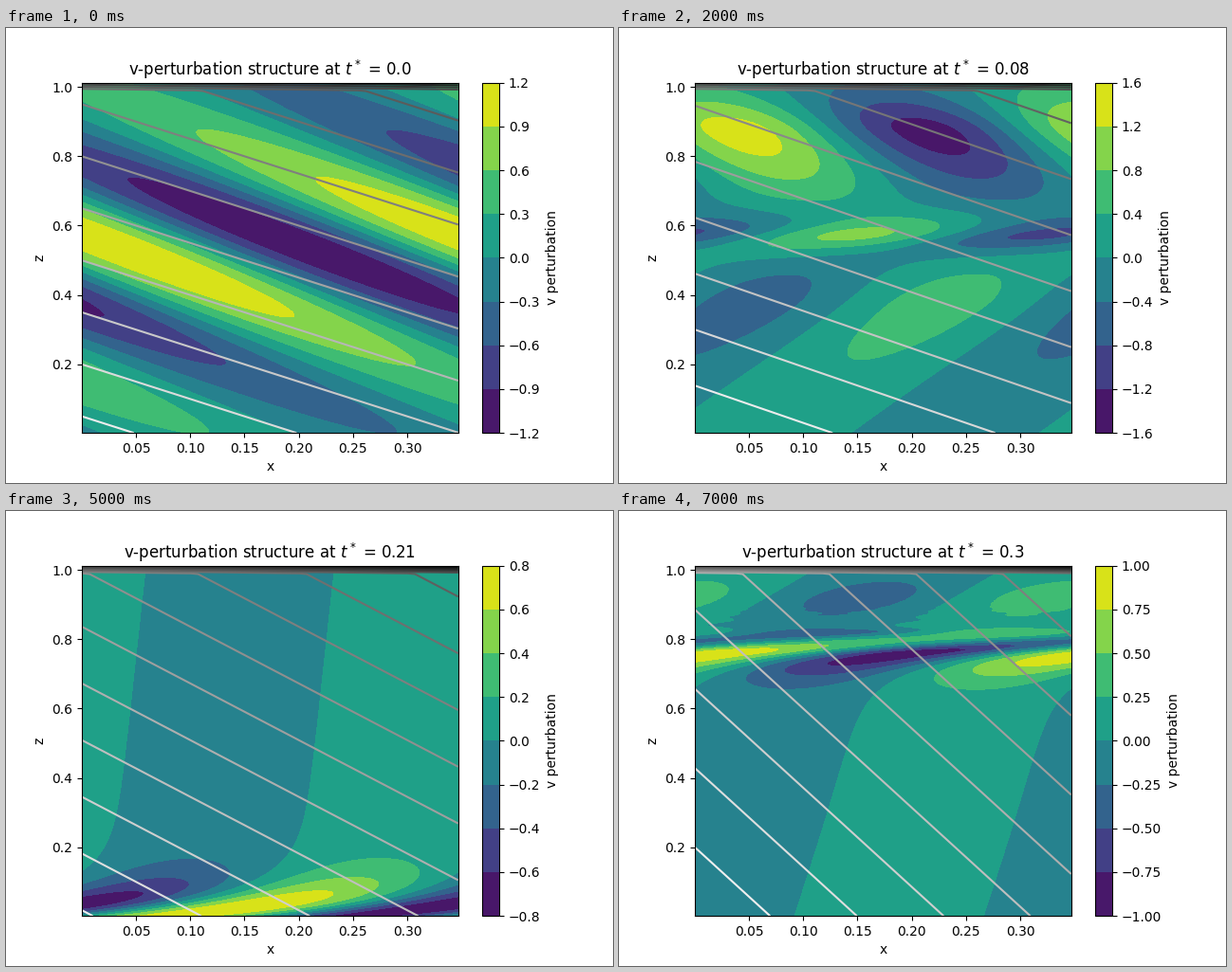
Write a matplotlib script that moves like this. It is 640 px wide and 480 px high and loops after 8000 ms.

```python
import numpy as np
import matplotlib.pyplot as plt
from matplotlib.animation import FuncAnimation

STEPS = 8
DT = 0.0424
WAVELENGTH = 0.3485
SHELF = 0.99           # base of the strongly stratified layer
SHELF_GRADIENT = 24.5

x = np.linspace(0.0001, 0.3471, 160)
z = np.linspace(0.002, 1.0125, 500)
X, Z = np.meshgrid(x, z)


def packet(amp, height, down, up, crest, tilt=0, lag=0, fade=1):
    """Wave packet with a sech envelope and a crest line that leans with height.

    down, up: envelope depth below and above its height
    crest, tilt: crest position at that height and its slope
    lag, fade: exponential bend of the crest line
    """
    s = Z - height
    envelope = amp / np.cosh(s / np.where(s < 0, down, up))
    line = crest + tilt * s + lag * (np.exp(s / fade) - 1)
    return envelope * np.cos(2 * np.pi * (X - line) / WAVELENGTH)


def tilted():
    return packet(1.18, 0.54, 0.265, 0.26, 0.03, tilt=-0.79)


def steepening():
    return (packet(1.55, 0.83, 0.23, 0.095, -0.055, tilt=-0.4)
            + packet(0.38, 0.1, 0.06, 0.06, 0.2, tilt=0.6))


def layered():
    return (packet(1.4, 0.87, 0.115, 0.075, 0.04, tilt=-0.38)
            + packet(0.85, 0.57, 0.033, 0.033, 0.14, tilt=1.35)
            + packet(0.55, 0.36, 0.18, 0.1, 0.218, tilt=0.45))


def bottom_trapped(m):
    """Jet that sinks and thins against the floor while drifting right."""
    shrink = 0.71 ** m
    height = 0.095 * 0.45 ** m
    up = 0.145 * shrink
    fade = 0.03 + 0.5 * up
    bend = (0.178 + 0.0135 * m) * np.exp(-height / fade)
    crest = 0.148 + 0.0685 * m + 0.035 * height - bend
    return packet(0.74 + 0.01 * m ** 2, height, 0.095 * shrink, up, crest,
                  tilt=0.035, lag=-bend, fade=-fade)


def critical_layer():
    return (packet(0.95, 0.76, 0.052, 0.022, 0.375,
                   tilt=0.1, lag=0.12, fade=0.05)
            + packet(0.25, 0.823, 0.01, 0.01, 0.285)
            + packet(0.37, 0.92, 0.05, 0.05, 0.3265, tilt=0.55))


def perturbation(n):
    if 3 <= n <= 6:
        return bottom_trapped(n - 3)
    return {0: tilted, 1: steepening, 2: layered, 7: critical_layer}[n]()


def buoyancy(n):
    loss = 0.4825 * (1 - np.cos(0.275 * n))
    below = np.minimum(Z, SHELF)
    above = np.maximum(Z - SHELF, 0)
    return X + (1 - loss) * (below - 1) + SHELF_GRADIENT * above + 0.2


LIMITS = (1.2, 1.6, 1.6, 0.8, 0.8, 0.8, 1.0, 1.0)


def draw(n):
    fig.clf()
    ax = fig.add_subplot()
    levels = np.linspace(-LIMITS[n], LIMITS[n], 9)
    filled = ax.contourf(X, Z, perturbation(n), levels)
    fig.colorbar(filled, ax=ax, label="v perturbation")
    ax.contour(X, Z, buoyancy(n), 15, cmap="gray_r")
    ax.set_xlabel("x")
    ax.set_ylabel("z")
    ax.set_title(f"v-perturbation structure at $t^*$ = {round(n * DT, 2)}",
                 pad=5.3)
    return []


fig = plt.figure(figsize=(6.4, 4.8), dpi=100)
anim = FuncAnimation(fig, draw, frames=STEPS, interval=1000, repeat=True)
plt.show()
```
